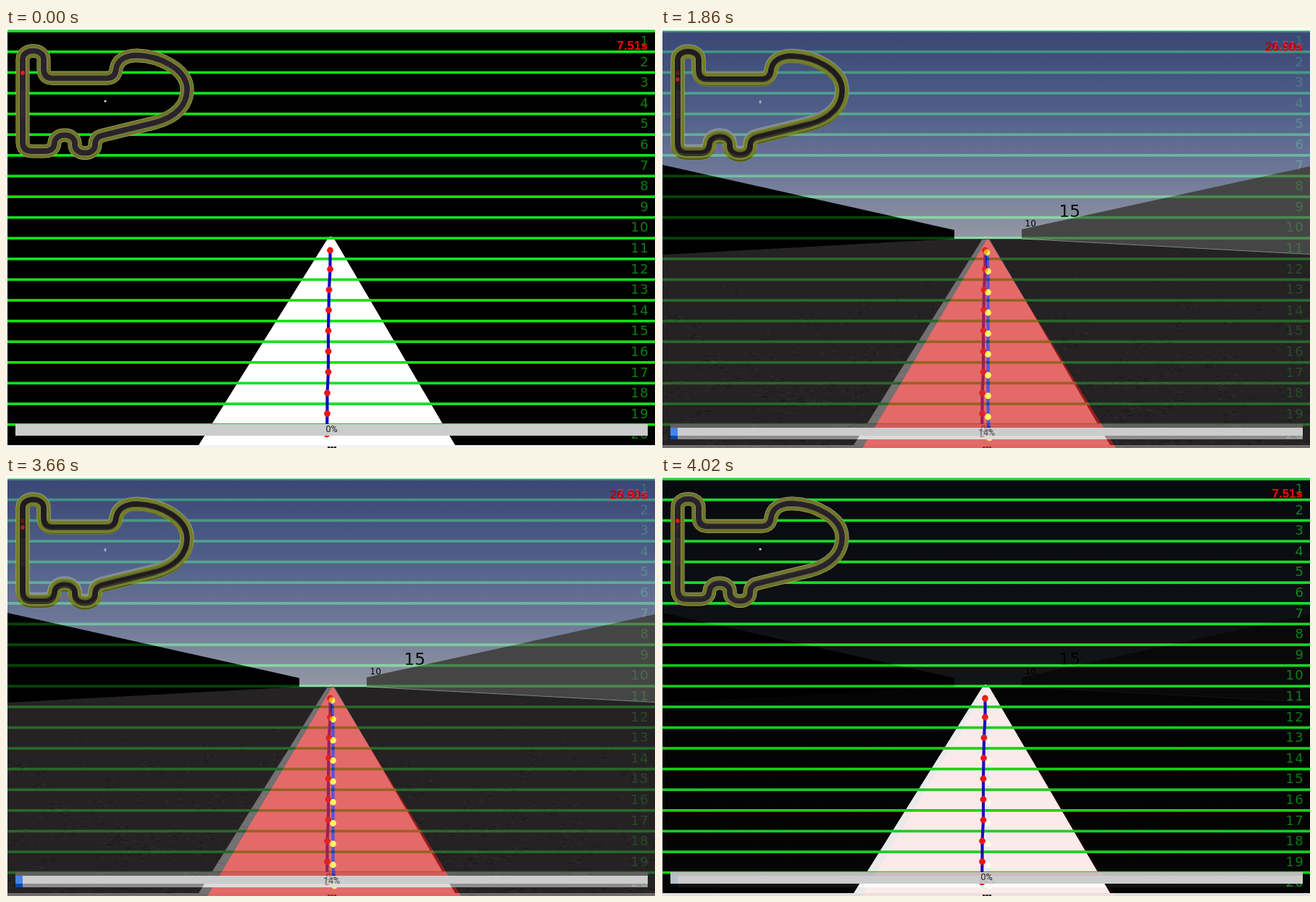
Write an HTML page that moves like this. It is 896x580 px and loops after 4.08 s.

```html
<!DOCTYPE html>
<html lang="en">
<head>
<meta charset="utf-8">
<title>Lane following</title>
<style>
  html, body { margin: 0; width: 896px; height: 580px; overflow: hidden; background: #fff; }
  svg { display: block; }
  .time { font: bold 17px "Liberation Sans", Arial, sans-serif; fill: #f00; text-anchor: end; }
  .percent { font: 12.5px Roboto, sans-serif; fill: #111; text-anchor: middle; }
  .sign { font-family: "DejaVu Sans", sans-serif; fill: #0a0a0a; }
  .row { font: 18px "DejaVu Sans", sans-serif; letter-spacing: 1.2px; fill: #0b8012; }
  .track { fill: none; stroke-linejoin: round; }
</style>
</head>
<body>
<svg width="896" height="580" viewBox="0 0 896 580">
  <defs>
    <linearGradient id="sky" x1="0" y1="0" x2="0" y2="1">
      <stop offset="0" stop-color="#5467a8"/>
      <stop offset=".35" stop-color="#7085c3"/>
      <stop offset=".7" stop-color="#a1b0dc"/>
      <stop offset="1" stop-color="#d3dbec"/>
    </linearGradient>
    <path id="course" d="M23 160V44C23 29 52 29 52 44V58Q52 71 64 71H139Q151 71 152 58C154 46 164 39 181 39C212 40 250 58 250 87C250 108 235 125 206 133L133 151Q124 153 123 162V165C122 179 96 179 95 165V161C94 147 68 147 67 161Q66 173 54 173H36Q23 173 23 160Z"/>
  </defs>
  <g id="camera"></g>
  <g id="mask"></g>
</svg>
<script>
const camera = document.getElementById('camera');
const mask = document.getElementById('mask');

const rect = (x, y, w, h, fill) =>
  `<rect x="${x}" y="${y}" width="${w}" height="${h}" fill="${fill}"/>`;
const poly = (points, fill) => `<polygon points="${points}" fill="${fill}"/>`;
const text = (cls, x, y, s, more = '') => `<text class="${cls}" x="${x}" y="${y}" ${more}>${s}</text>`;
const dot = (x, y, r, fill) => `<circle cx="${x}" cy="${y}" r="${r}" fill="${fill}"/>`;

function path(points, color) {
  return `<polyline points="${points.join(' ')}" fill="none" stroke="#0c0acb" stroke-width="4.2"/>` +
    points.map(([x, y]) => dot(x, y, 4.4, color)).join('');
}

function miniMap(transform, grass, asphalt, carY) {
  const band = (color, width) =>
    `<use href="#course" class="track" stroke="${color}" stroke-width="${width}"/>`;
  return `<g transform="${transform}">` +
    band('#b9bd8a', 19) + band(grass, 18) + band('#a3a671', 9) + band(asphalt, 8) +
    '<path d="M22 88V126M25 88V126" stroke="#666" stroke-dasharray="1 2"/>' +
    dot(137, 103, 1.6, '#d5dccb') + '</g>' + dot(23, carY, 2.9, '#f01818');
}

function progress(y, percent, width) {
  return rect(13, y, 873, 16, '#ccc') + rect(13, y, width, 16, '#0a64ff') +
    text('percent', 449.5, y + 11.3, percent + '%');
}

// Seeded clusters of gravel that grow towards the viewer
function gravel() {
  let seed = 7;
  const rand = () => (seed = seed * 16807 % 2147483647) / 2147483647;
  const shades = ['', ''];
  for (let i = 0; i < 300; i++) {
    const cx = 2 + 894 * rand(), cy = 302 + 278 * rand() ** 0.7;
    const depth = (cy - 290) / 290;
    for (let j = 0; j < 8; j++) {
      const x = cx + (rand() - 0.5) * 50 * depth;
      const y = cy + (rand() - 0.5) * 18 * depth;
      const w = 1 + 8 * depth * rand();
      shades[j % 2] += `M${Math.max(2, x).toFixed(1)} ${y.toFixed(1)}l${w.toFixed(1)} ${(rand() - 0.5).toFixed(1)}`;
    }
  }
  return shades.map((d, i) =>
    `<path d="${d}" stroke="${['#211f20', '#484546'][i]}" stroke-width="1.5" opacity=".6"/>`).join('');
}

const yellowYs = [310, 336, 365, 393, 422, 450.5, 479.5, 508, 537, 566];
const yellow = yellowYs.map((y, i) => [i === 0 ? 450 : i === 9 ? 453.5 : 451.5, y]);
const red = [[447.5, 307], [447.5, 333], [446, 361.5], [445.5, 389.5], [445, 418],
  [445, 446.5], [445, 475], [443.5, 504], [443.5, 532.5], [443, 561]];

camera.innerHTML =
  rect(2, 4, 894, 287, 'url(#sky)') +
  rect(2, 291, 894, 289, '#353233') + gravel() +
  poly('2,189 405,279 405,291 2,313', '#000') +
  poly('896,191 498,278 498,291 896,312', '#646464') +
  '<path d="M498 291L896 312.5" stroke="#b4c4bb"/>' +
  text('sign', 549.5, 261, '15', 'font-size="23"') +
  text('sign', 502.5, 274, '10', 'font-size="12"') +
  poly('451,290 628,580 278,580', '#d92929') +
  path(yellow, '#fff01a') +
  progress(552, 14, 10) +
  miniMap('', '#748320', '#1b1a1a', 71) +
  text('time', 886, 32, '26.90s');

let rows = '';
for (let i = 0; i < 20; i++) {
  const y = 4.2 + i * 28.6;
  rows += rect(2, y - 1.8, 894, 3.7, '#0fe31a') +
    text('row', i < 9 ? 875.5 : 862.5, y + 19.8, i + 1);
}

mask.innerHTML =
  rect(0, 0, 896, 580, '#fff') +
  rect(2, 3, 894, 573, '#000') +
  poly('447,288 449,288 453,291 620,576 266,576 444,291', '#fff') +
  rows + path(red, '#f01414') +
  progress(547, 0, 0) +
  rect(0, 576, 896, 4, '#f3f2f0') +
  [444, 448.3, 452.6].map(x => rect(x, 578, 3.4, 2, '#222')).join('') +
  miniMap('translate(0 -.7) scale(1 .987)', '#6f7428', '#29232a', 62) +
  text('time', 886, 30, '7.51s');

// Ten-step cross-fade: hold 1500 ms, fade out, hold 1500 ms, fade back
function maskOpacity(t) {
  const half = t % 2040;
  const step = half < 1500 ? 0 : Math.floor((half - 1500) / 60) + 1;
  return t < 2040 ? 1 - step / 10 : step / 10;
}

const start = performance.now();
function draw() {
  mask.setAttribute('opacity', maskOpacity((performance.now() - start) % 4080));
  requestAnimationFrame(draw);
}
draw();
</script>
</body>
</html>
```
